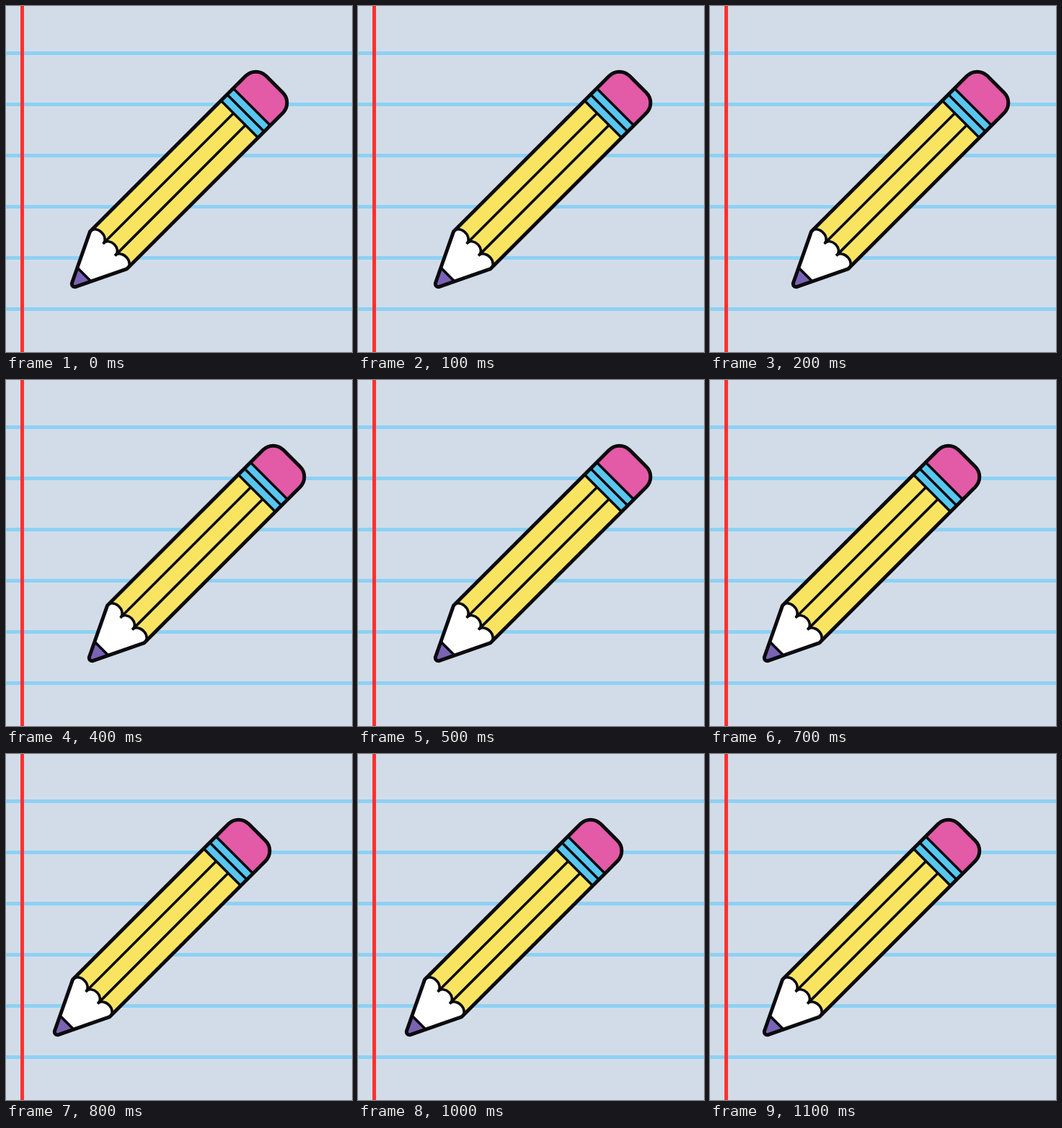
Animation of 480 by 480 pixels, one loop 1200 ms. Source, as an HTML page:

```html
<!DOCTYPE html>
<html lang="en">
<head>
<meta charset="utf-8">
<title>Pencil on lined paper</title>
<style>
  html, body { margin: 0; width: 100%; height: 100%; overflow: hidden; background: #d2dce8; }
  svg { display: block; width: 100vw; height: 100vh; }
</style>
</head>
<body>
<svg viewBox="0 0 480 480">
  <rect width="480" height="480" fill="#d2dce8"/>
  <path d="M0 65.5H480M0 136.5H480M0 207.5H480M0 278.5H480M0 349.5H480M0 420.5H480" stroke="#8dd1f4" stroke-width="5"/>
  <path d="M22.5 0V480" stroke="#ff302f" stroke-width="5"/>
  <g id="pencil">
    <!-- Drawn lying along the x axis, tip on the left -->
    <g transform="translate(240.5 240.5) rotate(-45)" stroke="#0b0a0d" stroke-width="3.6" stroke-linejoin="round">
      <g stroke="none">
        <path d="M-139-36.4H118V36.4H-139Z" fill="#f9e462"/>
        <path d="M118-36.4H142V36.4H118Z" fill="#57c7f0"/>
        <path d="M142-36.4H166.5A20 20 0 0 1 186.5-16.4V16.4A20 20 0 0 1 166.5 36.4H142Z" fill="#e35aa7"/>
      </g>
      <path d="M-207.5-3.5L-139-36.4A9.5 12.4 0 0 1-136.5-11.7A9 11.7 0 0 1-136.5 11.7A9.5 12.4 0 0 1-139 36.4L-207.5 3.5Q-211 0-207.5-3.5Z" fill="#fff"/>
      <path d="M-207.5-3.5L-186.8-13.4V13.4L-207.5 3.5Q-211 0-207.5-3.5Z" fill="#7a63b5"/>
      <path d="M-138-11.7H118M-138 11.7H118M118-36.4V36.4M130-36.4V36.4M142-36.4V36.4" fill="none"/>
      <path d="M-207.5-3.5L-139-36.4H166.5A20 20 0 0 1 186.5-16.4V16.4A20 20 0 0 1 166.5 36.4H-139L-207.5 3.5Q-211 0-207.5-3.5Z" fill="none" stroke-width="5"/>
    </g>
  </g>
</svg>
<script>
  const pencil = document.getElementById("pencil");
  const swing = [0, 16, 24, 28, 24, 16];
  const start = performance.now();

  // Six held steps to the right, then the same six mirrored to the left
  function draw() {
    const step = Math.floor((performance.now() - start) / 100) % 12;
    const x = swing[step % 6] * (step < 6 ? 1 : -1);
    pencil.setAttribute("transform", `translate(${x} 0)`);
    requestAnimationFrame(draw);
  }
  draw();
</script>
</body>
</html>
```
